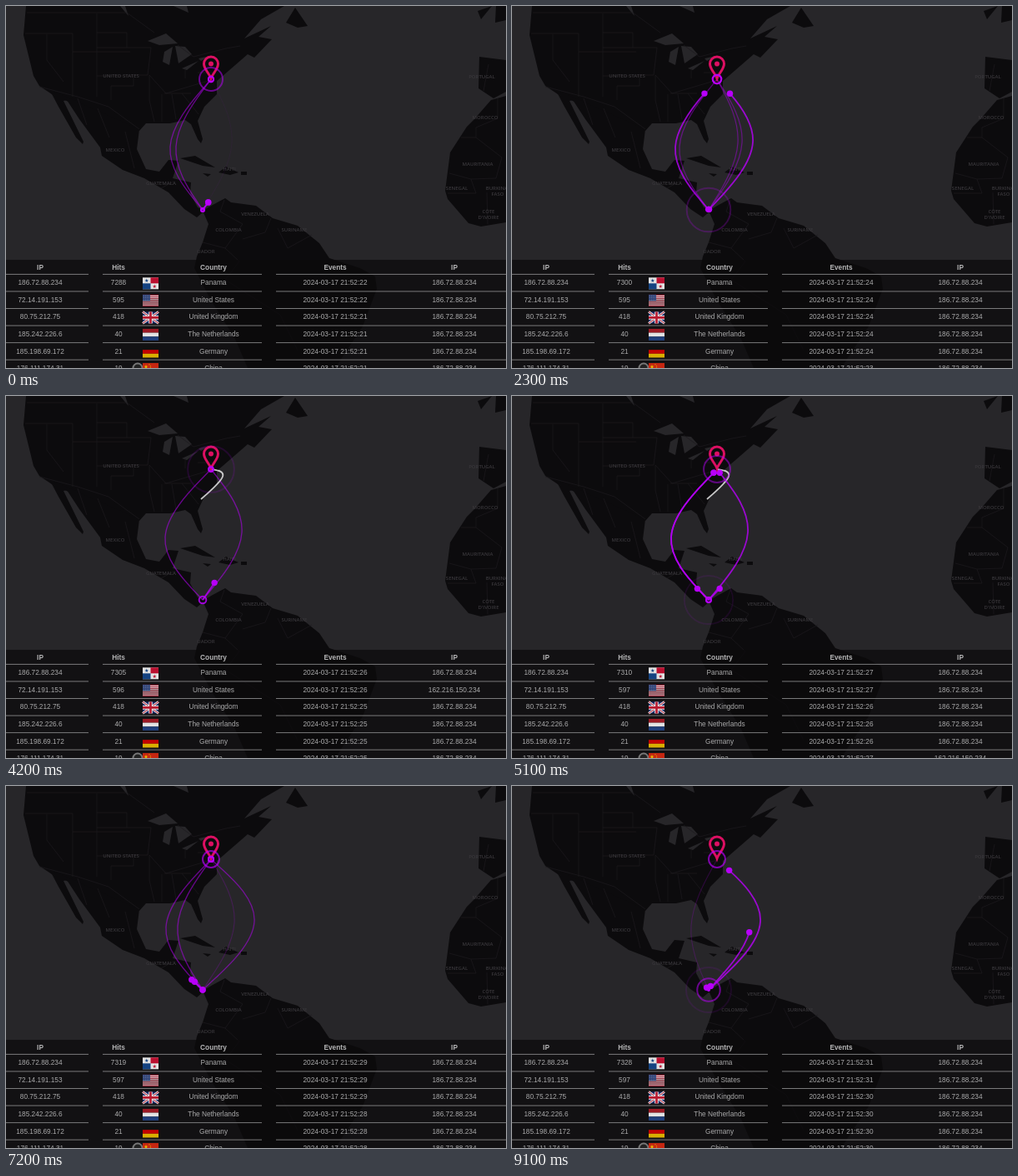
An HTML page for the animation above (9.2 s loop, 600x435 px).

```html
<!DOCTYPE html>
<html lang="en">
<head>
<meta charset="utf-8">
<title>Attack map</title>
<style>
  html, body { margin: 0; width: 100%; height: 100%; overflow: hidden; background: #272629; }
  svg { display: block; width: 600px; height: 435px; }
  .land { fill: #0c0b0d; }
  .water { fill: #272629; }
  .border { fill: none; stroke: #1d1b1f; stroke-width: .7; }
  .label { font: 600 6px "Open Sans", "Noto Sans", sans-serif; fill: #39373b; text-anchor: middle; }
  .cell { font: 8.3px "Liberation Sans", Arial, sans-serif; fill: #a9a9aa; text-anchor: middle; }
  .head { font-weight: bold; fill: #b4b4b5; }
  .rule { stroke: #868687; stroke-width: .9; }
  .shot { fill: none; }
</style>
</head>
<body>
<svg id="stage" viewBox="0 0 600 435" xmlns="http://www.w3.org/2000/svg">
  <rect width="600" height="435" class="water"/>
  <g class="land">
    <path d="M24 0L21 35 33 84 40 96 58 108 160 150 168 141 197 141 215 137 222 142 230 160 234 165 236 160 230 138 238 121 253 106 253 90 267 78 290 58 298 62 319 40 303 37 318 24 286 39 306 16 334 0Z"/>
    <path d="M52 100L63 121 84 158 92 166 93 163 69 114 73 113 88 136 113 170 115 180 140 197 166 207 195 224 214 244 229 254 236 248 243 247 230 242 221 225 222 212 200 207 207 186 195 185 184 199 168 196 157 172 160 148Z"/>
    <path d="M236 246L243 262 236 284 229 301 226 315 245 352 275 400 290 435H395L428 385 445 340 443 325 425 315 388 303 376 285 350 264 320 255 300 240 270 236 263 231 248 239Z"/>
    <path d="M336 20L347 2 362 24 350 26Z"/>
    <path d="M209 183L227 180 251 194 236 192Z"/>
    <path d="M255 200L264 193 279 200 269 203ZM236 201L246 202 242 205ZM282 199H289V203H282Z"/>
    <path d="M568 61L600 65V103L585 111 567 99Z"/>
    <path d="M582 113L600 108V260L570 265 555 261 530 232 527 222 533 176 553 145 562 136Z"/>
    <path d="M566 6L583 0 570 16ZM588 0H600V17L587 20Z"/>
  </g>
  <g class="water">
    <path d="M170 42L192 33 206 45 184 47Z"/>
    <path d="M190 55L200 49 196 71 188 67Z"/>
    <path d="M203 48L215 49 223 58 207 69Z"/>
    <path d="M211 75L231 66 217 77ZM231 63L245 60 234 66Z"/>
    <path d="M137 0H143L147 12ZM201 0H217L219 8Z"/>
  </g>
  <g class="border">
    <path d="M25 8H145L178 32M206 47L225 61 264 51 281 48M40 97L86 109 123 121 160 148"/>
    <path d="M23 33H80V109M49 34V65L69 91M109 9V109M109 32H145V50H109M80 55H149M109 84H153V96H126V113M145 50H174L170 83H153M172 83V113L178 139M172 83L192 105 246 89"/>
    <path d="M187 106V139M199 106L204 136M211 105L231 130M190 105H222M215 75V87M230 80H252M86 111L97 143M110 123L124 158M143 151L154 195M186 219L201 211"/>
    <path d="M262 233L257 247 284 262 263 291 236 284M284 280L311 272 318 255M326 267L338 291 367 275M263 291L280 307 263 329 329 371 350 414"/>
    <path d="M579 70L573 102M590 111V135L564 146V158H546M564 158L595 182 588 207 558 208 532 201M558 208L564 225H530M577 224L578 262"/>
  </g>
  <g id="labels"></g>
  <g id="traffic"></g>
  <g fill="none" stroke="#dc0f62">
    <path d="M246 87C244 81 237.500 76 237.500 69.500A8.500 8.500 0 0 1 254.500 69.500C254.500 76 248 81 246 87Z" stroke-width="3"/>
    <circle cx="246" cy="69.500" r="3" fill="#dc0f62" stroke="none"/>
  </g>
  <g id="rings"></g>
  <rect y="305" width="600" height="130" fill="#0b0a0c" opacity=".74"/>
  <g id="table"></g>
  <rect id="bar" x="313" y="306" width="2" height="24" fill="#777578"/>
</svg>
<script>
const LOOP = 9200, STEP = 100, FLY = 700, FADE = 560, RING = 30;
const HOME = { x: 246, y: 88 }, PANAMA = { x: 236, y: 245 }, STATES = { x: 234, y: 124 };
const PURPLE = "#b800fa";
const byId = id => document.getElementById(id);

function add(parent, tag, attrs, text) {
  const node = document.createElementNS("http://www.w3.org/2000/svg", tag);
  set(node, attrs);
  if (text !== undefined) node.textContent = text;
  parent.appendChild(node);
  return node;
}
function set(node, attrs) {
  for (const key in attrs) node.setAttribute(key, attrs[key]);
}

const label = (name, x, y) => add(byId("labels"), "text", { x, y, class: "label" }, name);
label("UNITED STATES", 138, 86);
label("MEXICO", 131, 175);
label("GUATEMALA", 186, 215);
label("VENEZUELA", 299, 252);
label("COLOMBIA", 267, 271);
label("SURINAME", 346, 271);
label("UADOR", 240, 297);
label("HAITI", 268, 198);
label("PORTUGAL", 571, 87);
label("MOROCCO", 575, 136);
label("MAURITANIA", 566, 192);
label("SENEGAL", 541, 221);
label("BURKINA", 589, 221);
label("FASO", 590, 228);
label("CÔTE", 579, 249);
label("D'IVOIRE", 579, 256);

// Each volley: launch time, then the sideways bend of every shot in it.
// Bend 0 is a shot from the States.
const hits = [
  [-1243, 30], [-1030, -44, -37], [-280, 37, 37], [165, -51, 24], [780, 24, 44],
  [1210, -40, 35, 30], [1630, -45, 48], [2185, 36, 30, -33], [2817, -39, 30],
  [3185, -50, 42], [3500, 0], [3833, 34], [4390, 0], [4407, -50, 42, -50],
  [4777, -53, 51], [5382, 23, 54], [6015, 33], [6175, -49, -35, 57], [6885, -56],
  [6910, -52], [7150, 40], [7360, -40, 35], [7660, 45, -30], [7915, -26],
  [8424, 57], [8560, 46], [8880, 24], [8910, -46]
].flatMap(([start, ...bends]) => bends.map(bend => makeHit(start, bend)));

// Uniform B-spline through source, bend point and home, written as Béziers.
function splinePath(a, m, b) {
  const mix = (i, j, k) => ["x", "y"]
    .map(c => ((a[c] * i + m[c] * j + b[c] * k) / 6).toFixed(2)).join(" ");
  return `M${mix(6, 0, 0)}L${mix(5, 1, 0)}C${mix(4, 2, 0)} ${mix(2, 4, 0)} ${mix(1, 4, 1)}` +
         `C${mix(0, 4, 2)} ${mix(0, 2, 4)} ${mix(0, 1, 5)}L${mix(0, 0, 6)}`;
}

function makeHit(start, bend) {
  const local = bend === 0;
  const from = local ? STATES : PANAMA;
  const mid = local ? { x: 270, y: 92 } : { x: 241 + 1.5 * bend, y: 166.5 - .09 * bend };
  const color = local ? "#f4f4f4" : PURPLE;
  const layer = byId("traffic");
  const line = add(layer, "path", { d: splinePath(from, mid, HOME), class: "shot", stroke: color });
  const ring = (p, parent) => add(parent, "circle",
    { cx: p.x, cy: p.y, fill: "none", stroke: color, "stroke-width": 2 });
  return {
    start, local, line,
    length: line.getTotalLength(),
    dot: add(layer, "circle", { r: 3.7, fill: color }),
    out: ring(from, layer),
    hit: ring(HOME, byId("rings"))
  };
}

function show(node, on) {
  node.style.display = on ? "" : "none";
  return on;
}

function drawRing(node, age) {
  if (!show(node, age >= 0 && age < FLY)) return;
  const grow = (age / FLY) ** 3;
  set(node, { r: RING * grow, opacity: 1 - grow });
}

function drawHit(h, time) {
  const age = time - h.start, flying = age >= 0 && age < FLY;
  const gone = Math.max(0, (age - FLY) / FADE);
  const reach = h.length * Math.min(1, Math.max(0, age) / FLY) ** 3;
  if (show(h.line, age >= 0 && gone < 1)) set(h.line, {
    "stroke-dasharray": `${reach} ${h.length + 5}`,
    "stroke-width": 1.8 - .8 * gone,
    opacity: .8 * (1 - gone * gone)
  });
  if (show(h.dot, flying)) {
    const p = h.line.getPointAtLength(reach);
    set(h.dot, { cx: p.x, cy: p.y });
  }
  drawRing(h.out, age);
  drawRing(h.hit, age - FLY);
}

const table = byId("table");
const cell = (x, y, text, extra = "") => add(table, "text", { x, y, class: "cell " + extra }, text);
const rowY = i => 335.3 + i * 20.55;

[["IP", 41], ["Hits", 135], ["Country", 249], ["Events", 395], ["IP", 538]]
  .forEach(([name, x]) => cell(x, 317, name, "head"));

const countries = [
  ["186.72.88.234", 7288, "Panama"], ["72.14.191.153", 595, "United States"],
  ["80.75.212.75", 418, "United Kingdom"], ["185.242.226.6", 40, "The Netherlands"],
  ["185.198.69.172", 21, "Germany"], ["176.111.174.31", 19, "China"]
];
add(table, "circle", { cx: 158, cy: 435, r: 5.5, fill: "#222", stroke: "#777", "stroke-width": 2 });

const rows = countries.map(([ip, count, name], i) => {
  const y = rowY(i), lineY = y - 12.9;
  [[0, 99], [116, 307], [324, 600]].forEach(([x1, x2]) =>
    add(table, "line", { x1, x2, y1: lineY, y2: lineY, class: "rule" }));
  cell(41, y, ip);
  cell(249, y, name);
  drawFlag(name, 164, y - 9);
  return { count: cell(135, y, count), stamp: cell(395, y, ""), ip: cell(538, y, "") };
});

function drawFlag(name, x, y) {
  const W = 19, H = 14;
  const g = add(table, "g", { transform: `translate(${x} ${y})`, opacity: .88 });
  const box = (fill, x, y, width, height) => add(g, "rect", { fill, x, y, width, height });
  const path = (d, stroke, width) => add(g, "path", { d, stroke, "stroke-width": width, fill: "none" });
  const bands = colors => colors.forEach((c, i) =>
    box(c, 0, i * H / colors.length, W, H / colors.length));
  const star = (cx, cy, r, fill) => add(g, "polygon", {
    fill, points: Array.from({ length: 10 }, (_, i) => {
      const a = i * Math.PI / 5, q = i % 2 ? r * .4 : r;
      return `${cx + q * Math.sin(a)},${cy - q * Math.cos(a)}`;
    }).join(" ")
  });
  const draw = {
    "Panama"() {
      box("#fff", 0, 0, W, H);
      box("#d21034", W / 2, 0, W / 2, H / 2);
      box("#164a91", 0, H / 2, W / 2, H / 2);
      star(W / 4, 3.7, 2.4, "#164a91");
      star(W * .75, 10.7, 2.4, "#d21034");
    },
    "United States"() {
      bands(Array.from({ length: 13 }, (_, i) => i % 2 ? "#fff" : "#c8233c"));
      box("#344a86", 0, 0, 9, 7.5);
      for (let i = 0; i < 12; i++)
        add(g, "circle", { cx: 1.2 + i % 4 * 2.2, cy: 1.3 + Math.floor(i / 4) * 2.4, r: .4, fill: "#fff" });
    },
    "United Kingdom"() {
      const diagonal = "M0 0L19 14M19 0L0 14", cross = "M9.5 0V14M0 7H19";
      box("#1c2f76", 0, 0, W, H);
      path(diagonal, "#fff", 2.8);
      path(diagonal, "#cf1b35", 1);
      path(cross, "#fff", 4.6);
      path(cross, "#cf1b35", 2.6);
    },
    "The Netherlands"() { bands(["#ae1c28", "#fff", "#21468b"]); },
    "Germany"() { bands(["#111", "#d00", "#f5c400"]); },
    "China"() {
      box("#de2910", 0, 0, W, H);
      star(4, 4.5, 2.6, "#ffde00");
      for (let i = 0; i < 4; i++) star(8 + (i % 3 ? 1.4 : 0), 1.8 + i * 2, .9, "#ffde00");
    }
  };
  draw[name]();
}

function stampOf(h) {
  const second = Math.floor(22.38 + h.start / 1000) + (h.local ? 1 : 0);
  return "2024-03-17 21:52:" + second;
}

function drawTable(time) {
  const seen = hits.filter(h => h.start <= time);
  const fresh = seen.filter(h => h.start >= 0);
  const local = fresh.filter(h => h.local).length;
  rows[0].count.textContent = countries[0][1] + fresh.length - local;
  rows[1].count.textContent = countries[1][1] + local;
  rows.forEach((row, i) => {
    const h = seen[seen.length - 1 - i];
    row.stamp.textContent = h ? stampOf(h) : "2024-03-17 21:52:21";
    row.ip.textContent = h && h.local ? "162.216.150.234" : countries[0][0];
  });
  show(byId("bar"), time >= 3100 && time < 3700);
}

function render(time) {
  hits.forEach(h => drawHit(h, time));
  drawTable(time);
}

const begin = performance.now();
function tick() {
  const time = (performance.now() - begin) % LOOP;
  render(Math.floor(time / STEP) * STEP);
  requestAnimationFrame(tick);
}
render(0);
requestAnimationFrame(tick);
</script>
</body>
</html>
```
